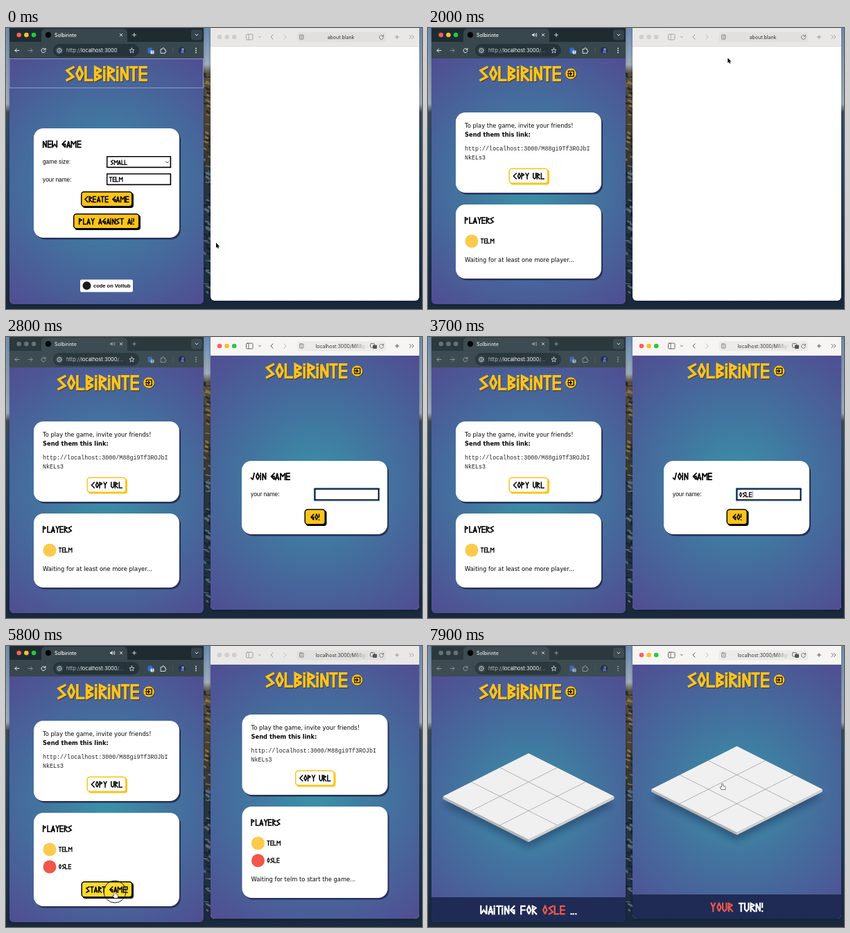
Recreate the animation shown at these times as an HTML page with a canvas. Size 600x406 px, loop 8 s.

```html
<!DOCTYPE html>
<html lang="en">
<head>
<meta charset="utf-8">
<title>Solbirinte</title>
<style>
html, body { margin: 0; width: 100%; height: 100%; overflow: hidden; background: #16233f; }
canvas { display: block; width: 600px; height: 406px; }
</style>
</head>
<body>
<canvas id="stage" role="img" aria-label="Solbirinte: two browser windows start a game"></canvas>
<script>
const LOOP = 8000, W = 600, H = 406;
const canvas = document.getElementById('stage');
const ratio = window.devicePixelRatio || 1;
canvas.width = W * ratio;
canvas.height = H * ratio;
const c = canvas.getContext('2d');

const YELLOW = '#fcc419', RED = '#f0564a', INK = '#050505';
const UI = 'Inter, Roboto, sans-serif';
const ARIAL = '"Liberation Sans", Arial, sans-serif';
const WIDE = '"DejaVu Sans", Verdana, sans-serif';
const MONO = '"Liberation Mono", "Courier New", monospace';
const HOST = 'TELM', GUEST = 'OSLE', GAME = 'Solbirinte';
const ROOM = 'M88gi9Tf3ROJbINkELs3';

// Moments of the story, in ms
const at = {
  create: 900, room: 1300, rightOn: 2100, paste: 2250, load: 2380, join: 2600,
  type: 3200, enter: 4300, leftOn: 5200, start: 5700, game: 6000, back: 7500
};
const clicks = [850, 1620, 2080, 4130, 5180, 5660, 7480];
const route = [
  [0, 303, 310], [150, 303, 310], [750, 172, 247], [1150, 172, 246], [1500, 150, 214],
  [1750, 150, 214], [2080, 480, 14], [3750, 480, 14], [4100, 446, 261], [4400, 446, 261],
  [5100, 157, 355], [5900, 157, 355], [6400, 101, 268], [7150, 101, 268],
  [7450, 424.5, 198.5], [8000, 424.5, 198.5]
];

// ---------- helpers ----------
function text(s, x, y, size, color, font = UI, align = 'left', weight = 400) {
  c.font = `${weight} ${size}px ${font}`;
  c.textAlign = align;
  c.fillStyle = color;
  c.fillText(s, x, y);
}
function box(x, y, w, h, r, fill, stroke, lw = 1) {
  c.beginPath();
  c.roundRect(x, y, w, h, r);
  if (fill) { c.fillStyle = fill; c.fill(); }
  if (stroke) { c.strokeStyle = stroke; c.lineWidth = lw; c.stroke(); }
}
function disc(x, y, r, fill) {
  c.beginPath();
  c.arc(x, y, r, 0, 7);
  c.fillStyle = fill;
  c.fill();
}
function line(d, x, y, color, lw = 1) {
  c.save();
  c.translate(x, y);
  c.lineCap = c.lineJoin = 'round';
  c.strokeStyle = color;
  c.lineWidth = lw;
  c.stroke(new Path2D(d));
  c.restore();
}
function poly(points, fill) {
  c.beginPath();
  points.forEach(([x, y]) => c.lineTo(x, y));
  c.closePath();
  c.fillStyle = fill;
  c.fill();
}
function ramp(x0, y0, x1, y1, stops) {
  const g = c.createLinearGradient(x0, y0, x1, y1);
  stops.forEach(([p, color]) => g.addColorStop(p, color));
  return g;
}
function random(seed) {
  return () => (seed = (seed * 16807) % 2147483647) / 2147483647;
}

// ---------- angular lettering: strokes over a 3 x 5 grid named a to o ----------
const glyphs = {
  A: 'mbo jl', B: 'mafglm', C: 'cgo', E: 'camo gi', F: 'cam gi', G: 'cgoih',
  H: 'am co gi', I: 'dm aa', J: 'cnj', L: 'amo', M: 'mahco', N: 'maoc', O: 'bgnib',
  P: 'mafg', R: 'mafgo', S: 'cdlm', T: 'ac bn', U: 'ajnlc', W: 'amhoc', Y: 'ahc hn',
  '!': 'ag mm', '.': 'mm'
};
const glyphWidth = ch => 'I!.'.includes(ch) ? 0.04 : 'MW'.includes(ch) ? 0.6 : ch === ' ' ? 0.3 : 0.4;
const letterWidth = (s, cap) => cap * ([...s].reduce((sum, ch) => sum + glyphWidth(ch) + 0.21, 0) - 0.06);

function letters(s, x, y, cap, color) {
  const weight = cap * 0.16;
  c.strokeStyle = color;
  c.lineWidth = weight;
  c.lineCap = 'square';
  c.lineJoin = 'miter';
  c.miterLimit = 2;
  x += weight / 2;
  [...s].forEach((ch, n) => {
    const w = glyphWidth(ch) * cap;
    c.beginPath();
    (glyphs[ch] || '').split(' ').filter(Boolean).forEach(stroke => {
      [...stroke].forEach((key, i) => {
        const k = key.charCodeAt(0) - 97;
        const px = x + (k % 3) / 2 * w + (n % 2 ? 0.15 : -0.15);
        const py = y + weight / 2 + Math.floor(k / 3) / 4 * (cap - weight);
        if (i) c.lineTo(px + (stroke === 'aa' || stroke === 'mm' ? 0.1 : 0), py);
        else c.moveTo(px, py);
      });
    });
    c.stroke();
    x += w + cap * 0.21;
  });
}
function centred(s, x, y, cap, color) {
  letters(s, x - letterWidth(s, cap) / 2, y, cap, color);
}

// ---------- page parts ----------
function backdrop(x, y, w, h) {
  const cx = x + w / 2, cy = y + h / 2;
  const g = c.createRadialGradient(cx, cy, 0, cx, cy, Math.hypot(w, h) / 2);
  g.addColorStop(0, '#3993a8');
  g.addColorStop(0.42, '#42749f');
  g.addColorStop(1, '#504d92');
  c.fillStyle = g;
  c.fillRect(x, y, w, h);
}
function logo(cx, y, exit) {
  const x = exit ? cx - 12 : cx;
  centred(GAME.toUpperCase(), x + 1, y + 1.2, 22, '#4c3f45');
  centred(GAME.toUpperCase(), x, y, 22, YELLOW);
  if (!exit) return;
  disc(cx + 61.4, y + 11.4, 8.2, '#3b3542');
  disc(cx + 61, y + 11, 7.8, YELLOW);
  line('M-3.6 -2V-3.8H4.2V3.8H-3.6V2M-4.6 0H1.2M-.6 -1.7L1.2 0-.6 1.7', cx + 61, y + 11, INK, 1.3);
}
function card(x, y, h) {
  box(x + 2, y + 2.5, 210, h, 14, '#2b3158');
  box(x, y, 210, h, 14, '#fff');
}
function button(s, x, y, w, h, fill, edge = INK) {
  box(x + 2, y + 2, w - 1, h - 1, 4, edge);
  box(x + 0.7, y + 0.7, w - 2, h - 2, 4, fill, edge, 1.5);
  centred(s, x + w / 2, y + h / 2 - 4.8, 9.5, INK);
}
function field(s, x, y, color = INK) {
  box(x + 1.5, y + 1.5, 92, 16, 0, '#aaa');
  box(x + 0.7, y + 0.7, 91.6, 15.6, 0, '#fff', color, 1.5);
  letters(s, x + 4, y + 5, 7.5, color);
}
function token(x, y, color, name, dotted) {
  disc(x, y, 9.5, color);
  if (dotted) {
    for (let i = -3; i <= 3; i++) for (let j = -3; j <= 3; j++)
      if (Math.hypot(i, j) < 3.5) disc(x + i * 2.5, y + j * 2.5, 0.7, '#ffe08a');
  }
  letters(name, x + 13, y - 4, 7.5, INK);
}
function newGame(t) {
  const off = t >= at.create;
  const p = cursor(t);
  logo(145, 55, false);
  card(40, 145, 158);
  letters('NEW GAME', 53, 162.5, 10.8, INK);
  text('game size:', 53, 196, 8.3, INK, ARIAL);
  text('your name:', 53, 221.5, 8.3, INK, ARIAL);
  field('', 145, 185, off ? '#777' : INK);
  letters('SMALL', 151, 190.5, 7.5, off ? '#999' : INK);
  line('M-2 -1L0 1 2 -1', 232.5, 194, off ? '#999' : INK, 0.9);
  field(HOST, 145, 210);
  const hover = p.x < 183 && p.y < 259;
  button('CREATE GAME', 108, 236, 75, 23, off ? '#dedede' : hover ? '#ffd92e' : YELLOW);
  button('PLAY AGAINST AI!', 97, 268, 96, 23, off ? '#c9c9c9' : YELLOW);
  box(107, 363.5, 76, 18, 2, '#fff');
  disc(116.5, 372.3, 6, '#1b1b1b');
  text('code on Voltub', 126, 375, 7.5, INK, ARIAL, 'left', 700);
}
function room(cx, top, y, players, host, hot) {
  const x = cx - 92, y2 = y + 133, extra = players > 1;
  logo(cx, top + 11, true);
  card(cx - 105, y, 116);
  text('To play the game, invite your friends!', x, y + 22, 8.35, INK, WIDE);
  text('Send them this link:', x, y + 34.7, 8.35, INK, WIDE, 'left', 700);
  const link = 'http://localhost:3000/' + ROOM;
  text(link.slice(0, 36), x, y + 55, 8.37, '#222', MONO);
  text(link.slice(36), x, y + 67.5, 8.37, '#222', MONO);
  button('COPY URL', cx - 28.5, y + 80.5, 57.5, 23, '#fff', YELLOW);
  card(cx - 105, y2, !extra ? 107 : host ? 135 : 132);
  letters('PLAYERS', x, y2 + 18, 10, INK);
  token(x + 10, y2 + 53, '#fac43a', HOST, true);
  if (extra) token(x + 10, y2 + 78, RED, GUEST);
  if (!extra) text('Waiting for at least one more player...', x, y2 + 83, 8.35, INK, WIDE);
  else if (!host) text(`Waiting for ${HOST.toLowerCase()} to start the game...`, x, y2 + 107.7, 8.35, INK, WIDE);
  else button('START GAME!', 108.5, y2 + 99, 74.5, 24, hot ? '#ffdb2e' : YELLOW);
}
function joinGame(t) {
  logo(445.5, 38, true);
  card(340, 179, 106);
  letters('JOIN GAME', 353, 196, 11, INK);
  text('your name:', 353, 230, 8.3, INK, ARIAL);
  const typed = GUEST.slice(0, Math.max(0, Math.floor((t - at.type) / 110)));
  box(443.8, 217.8, 95.4, 19.4, 1.5, '#3a80e8');
  field(typed, 445, 219);
  const end = 449.5 + (typed ? letterWidth(typed, 7.5) + 0.8 : 0);
  if (t % 1000 < 500 || typed) line('M0 0V9', end, 223, '#2a62c8', 0.8);
  button('GO!', 430.5, 248.5, 31, 23.5, YELLOW);
}
function board(cx, cy) {
  const rx = 123.5, ry = 62.3, deep = 3.6;
  const spot = (u, v, dy = 0) => [cx + (u - v) * rx, cy - ry + (u + v) * ry + dy];
  c.save();
  c.shadowColor = 'rgba(25,45,85,.5)';
  c.shadowBlur = 11 * ratio;
  c.shadowOffsetY = 8 * ratio;
  poly([spot(0, 0, deep), spot(1, 0, deep), spot(1, 1, deep), spot(0, 1, deep)], '#999');
  c.restore();
  poly([spot(0, 1), spot(1, 1), spot(1, 1, deep), spot(0, 1, deep)], '#b5b5b5');
  poly([spot(1, 0), spot(1, 1), spot(1, 1, deep), spot(1, 0, deep)], '#cfcfcf');
  poly([spot(0, 0), spot(1, 0), spot(1, 1), spot(0, 1)], '#f1f0f1');
  for (const k of [1 / 3, 2 / 3]) {
    for (const ends of [[spot(k, 0), spot(k, 1)], [spot(0, k), spot(1, k)]])
      line(`M${ends[0]}L${ends[1]}`, 0, 0, '#85858a', 0.6);
  }
}
function game(cx, cy, x, y, w, h, bar, parts) {
  logo(cx, y + 11, true);
  board(cx, cy);
  c.fillStyle = '#1f2b54';
  c.fillRect(x, y + h - bar, w, bar);
  const cap = 13.6, all = parts.map(p => p[0]).join('');
  let px = cx - letterWidth(all, cap) / 2;
  parts.forEach(([s, color]) => {
    letters(s, px, y + h - bar + 11.7, cap, color);
    px += letterWidth(s, cap) + cap * 0.06;
  });
}

// ---------- windows ----------
function lights(x, y, step, on, idle) {
  ['#fe5f57', '#febb2e', '#29c83f'].forEach((color, i) => disc(x + i * step, y, 3.3, on ? color : idle));
}
function speaker(x, y, color) {
  poly([[x - 3, y - 1], [x - 1.5, y - 1], [x + 0.5, y - 3], [x + 0.5, y + 3], [x - 1.5, y + 1], [x - 3, y + 1]], color);
  line('M2 -1.5Q3 0 2 1.5M3.3 -2.6Q5 0 3.3 2.6', x, y, color, 0.8);
}
const reload = 'M2.4 -1.8A3 3 0 1 0 3 .6M3 -3.2V-1.2H.9';

function frame(x, y, w, h, paint) {
  c.save();
  c.shadowColor = 'rgba(0,0,0,.3)';
  c.shadowBlur = 5 * ratio;
  box(x, y, w, h, 6, '#333');
  c.restore();
  c.save();
  c.beginPath();
  c.roundRect(x, y, w, h, 6);
  c.clip();
  paint();
  c.restore();
}
function leftBar(t, on) {
  const bar = on ? '#38474d' : '#3d4c52', ink = on ? '#e4eaec' : '#909b9f';
  c.fillStyle = on ? '#1e2c32' : '#2b393f';
  c.fillRect(5, 0, 280, 22);
  box(51, 1, 124, 24, 6, bar);
  c.fillStyle = bar;
  c.fillRect(5, 20, 280, 24);
  lights(18.7, 10, 10.7, on, '#667277');
  disc(61, 10, 4.2, '#050505');
  text(GAME, 70, 12.6, 7, on ? '#f8fafa' : '#e2e6e8', UI, 'left', 500);
  if (t >= at.room) speaker(153, 10, ink);
  line('M-1.8 -1.8L1.8 1.8M1.8 -1.8L-1.8 1.8', 166, 10, on ? ink : '#d5dadc', 0.9);
  line('M-2.5 0H2.5M0 -2.5V2.5', 185, 10, ink, 0.9);
  box(267, 2.5, 16, 15, 4, on ? '#35444a' : '#3d4c52');
  line('M-2 -1L0 1 2 -1', 275, 10, on ? ink : '#d5dadc', 1);
  line('M3 0H-3M-.5 -2.6L-3 0-.5 2.6', 16, 32.5, ink, 1);
  line('M-3 0H3M.5 -2.6L3 0 .5 2.6', 35, 32.5, '#849095', 1);
  line(reload, 54, 32.5, ink, 1);
  box(68, 23, 124, 18.5, 9, on ? '#25343a' : '#2b393f');
  disc(77, 32.5, 5.5, on ? '#3a4a50' : '#3f4e54');
  c.beginPath();
  c.arc(77, 32.5, 3, 0, 7);
  c.strokeStyle = '#dfe5e7';
  c.lineWidth = 0.8;
  c.stroke();
  line('M0 -.3V1.4M0 -1.6V-1.5', 77, 32.5, '#dfe5e7', 0.8);
  const inside = t >= at.room, scheme = 'http://', host = 'localhost:3000';
  text(scheme, 87, 35.2, 7.4, '#b4bdc1');
  let x = 87 + c.measureText(scheme).width;
  text(host, x, 35.2, 7.4, '#f8fafa');
  x += c.measureText(host).width;
  if (inside) text('/...', x, 35.2, 7.4, '#b4bdc1');
  line('M0 -3.6L1 -1.1 3.6 -1 1.6 .8 2.3 3.4 0 1.9-2.3 3.4-1.6 .8-3.6 -1-1 -1.1Z', 181.5, 32.5, '#dfe5e7', 0.8);
  box(204.5, 28.5, 6.5, 8, 1.5, on ? '#2e6be0' : '#3f6caf');
  box(208.5, 32.5, 5, 5, 1, on ? '#dfe8f6' : '#a5b2c0');
  text('1', 211, 36.8, 4.6, '#234', UI, 'center');
  line('M-3 -2H-1Q-1 -4 .3 -4T1.6 -2H3V0Q4.6 0 4.6 1.2T3 2.4V4H-3Z', 226.5, 32.5, ink, 0.9);
  line('M0 -4V4', 241, 32.5, '#4e5c62', 0.8);
  disc(254, 32.5, 5, '#222b55');
  disc(255, 31, 2, on ? '#7c8dc4' : '#5f6d98');
  box(252, 33, 5, 3.5, 1.5, '#5570b0');
  [-3, 0, 3].forEach(dy => disc(274, 32.5 + dy, 0.9, ink));
}
function rightBar(t, on) {
  const ink = on ? '#555' : '#999', pale = '#bdbcbb';
  c.fillStyle = on ? '#f6f5f4' : '#e9e8e7';
  c.fillRect(295, 0, 301, 27);
  lights(308, 13, 10.6, on, '#cfcecd');
  box(346.5, 9, 9.5, 8, 1.5, null, ink, 0.9);
  line('M0 0V7.5', 350, 9.3, ink, 0.8);
  line('M-1.6 -.8L0 .8 1.6 -.8', 366, 13, ink, 0.8);
  line('M1.6 -3.2L-1.6 0 1.6 3.2', 383.5, 13, ink, 1);
  line('M-1.6 -3.2L1.6 0-1.6 3.2', 402.5, 13, pale, 1);
  box(419.5, 6, 128.5, 14.5, 3.5, on ? '#ecebea' : '#e1e0df');

  line('M-2.5 0H2.5M0 -2.5V2.5', 564, 13, ink, 1);
  line('M-3 -2.5L-.5 0-3 2.5M.5 -2.5L3 0 .5 2.5', 585, 13, ink, 0.9);

  const url = 'localhost:3000/' + ROOM;
  const fade = (x, end, color) => ramp(x, 0, end, 0, [[0, color], [0.72, color], [1, 'rgba(90,90,90,0)']]);
  const loading = t >= at.load && t < at.join;
  if (t >= at.paste && t < at.join) {
    c.save();
    c.beginPath();
    c.rect(425, 6, 109, 15);
    c.clip();
    text(url, 433, 15.7, 7, fade(433, 550, '#4a4a4a'));
    c.restore();
    if (loading) {
      const part = Math.min(1, 0.1 + (t - at.load) / 500);
      box(421, 19.2, 124 * part, 1.4, 0.7, '#2d79e6');
    }
  } else if (t >= at.join) {
    const loud = t >= at.game && t < at.back, end = loud ? 510 : 522;
    c.save();
    c.beginPath();
    c.rect(440, 6, end - 440, 15);
    c.clip();
    text(url, 446.5, 15.7, 7, fade(446, end, '#333'));
    c.restore();
    if (loud) speaker(518, 13, '#2b7de9');
    box(525.5, 9.5, 6, 5.5, 1, null, '#555', 0.8);
    box(529, 11.5, 6, 5.5, 1, '#555');
  } else if (t >= at.rightOn) {
    box(456, 8, 54, 10, 0, '#b3d3fb');
    text('about:blank', 483, 15.7, 7, '#333', UI, 'center');
  } else {
    text('about:blank', 483, 15.7, 7, '#333', UI, 'center');
  }
  if (t < at.paste || t >= at.join) {
    box(423.5, 9.8, 5.5, 6.5, 1, null, '#666', 0.7);
    line('M0 0H2.5M0 2.6H2.5', 425, 11.7, '#666', 0.7);
  }
  if (loading) line('M-2.2 -2.2L2.2 2.2M2.2 -2.2L-2.2 2.2', 541.5, 13, '#666', 0.9);
  else line(reload, 541.5, 13.3, '#666', 0.8);
  c.fillStyle = 'rgba(0,0,0,.12)';
  c.fillRect(295, 26.5, 301, 0.5);
}
function wallpaper() {
  c.fillStyle = ramp(0, 0, 0, H, [[0, '#7391b1'], [0.27, '#a3b1bf'], [0.3, '#3f4c57'], [0.36, '#2f4d68'], [0.8, '#1c3350'], [1, '#18273c']]);
  c.fillRect(0, 0, W, H);
  c.fillStyle = ramp(0, 0, 0, H, [[0, '#6d8fb8'], [0.13, '#a3b1bf'], [0.16, '#5a5343'], [0.4, '#433f37'], [0.55, '#28343f'], [0.8, '#24364a'], [1, '#18273c']]);
  c.fillRect(284, 0, 12, H);
  // sunlit rocks above, surf below
  const rnd = random(77);
  for (let i = 0; i < 90; i++) {
    const y = 64 + rnd() * 330, x = 284 + rnd() * 9, w = 3 + rnd() * 6, h = 2 + rnd() * 5;
    const lit = rnd();
    const tone = y < 200 ? ['#2b2b29', '#8a7748'] : ['#172433', '#5d6c78'];
    poly([[x, y], [x + w, y + h * 0.6], [x + w * 0.7, y + h], [x - 1, y + h * 0.5]], tone[lit > 0.5 ? 1 : 0]);
  }
  c.fillStyle = '#1a2a3e';
  c.fillRect(0, 399, W, 7);
}

// ---------- pointer ----------
function cursor(t) {
  let i = 1;
  while (i < route.length - 1 && t > route[i][0]) i++;
  const [t0, x0, y0] = route[i - 1], [t1, x1, y1] = route[i];
  const p = Math.min(1, (t - t0) / (t1 - t0));
  const e = p * p * (3 - 2 * p);
  return { x: x0 + (x1 - x0) * e, y: y0 + (y1 - y0) * e };
}
const arrow = new Path2D('M0 0V8.6L2 6.9 3.3 9.8 4.7 9.2 3.4 6.3H6Z');
const hand = new Path2D('M-1 1Q-1 0 0 0T1 1V4L4 4.6Q5.4 5 5.2 6.4L4.4 10H-.8L-3.6 6.4Q-3.4 5 -1 6.2Z');

function pointer(t) {
  if (t >= at.paste && t < 3780) return;
  const { x, y } = cursor(t);
  const over = [[620, 1230], [1420, 1820], [4020, 4300], [5050, 6000], [7380, LOOP]].some(([a, b]) => t >= a && t < b);
  const age = Math.min(...clicks.filter(k => k <= t).map(k => t - k));
  if (age < 240) {
    c.beginPath();
    c.arc(x, y, 12 + Math.min(4, age / 30), 0, 7);
    c.strokeStyle = '#222';
    c.lineWidth = 1;
    c.stroke();
  }
  c.save();
  c.translate(x, y + (over ? 0.6 : 0.3));
  c.scale(0.85, 0.85);
  c.lineJoin = 'round';
  c.strokeStyle = over ? '#111' : '#fff';
  c.lineWidth = 1.2;
  c.stroke(over ? hand : arrow);
  c.fillStyle = over ? '#fff' : '#000';
  c.fill(over ? hand : arrow);
  c.restore();
}

// ---------- scene ----------
function draw(t) {
  c.setTransform(ratio, 0, 0, ratio, 0, 0);
  wallpaper();
  const leftOn = t < at.rightOn || (t >= at.leftOn && t < at.back);

  frame(5, -10, 280, 409, () => {
    backdrop(5, 44, 280, 355);
    if (t < at.room) newGame(t);
    else if (t < at.enter) room(145, 44, 122, 1, true);
    else if (t < at.game) room(145, 44, 108, 2, true, t > 5050);
    else game(145, 217.3, 5, 44, 280, 355, 36, [['WAITING FOR ', '#fff'], [GUEST, RED], [' ...', '#fff']]);
    if (t < 100) box(5.5, 44.5, 279, 42, 0, null, 'rgba(190,205,235,.7)', 0.8);
    leftBar(t, leftOn);
  });

  frame(295, -10, 301, 404, () => {
    c.fillStyle = '#fff';
    c.fillRect(295, 27, 301, 367);
    if (t >= at.join) backdrop(295, 27, 301, 367);
    if (t >= at.game) game(445.5, 207, 295, 27, 301, 367, 35, [['YOUR', RED], [' TURN!', '#fff']]);
    else if (t >= at.enter) room(445.5, 27, 99, 2, false);
    else if (t >= at.join) joinGame(t);
    rightBar(t, !leftOn);
  });
  pointer(t);
}

const begin = performance.now();
function tick() {
  draw((performance.now() - begin) % LOOP);
  requestAnimationFrame(tick);
}
tick();
</script>
</body>
</html>
```
